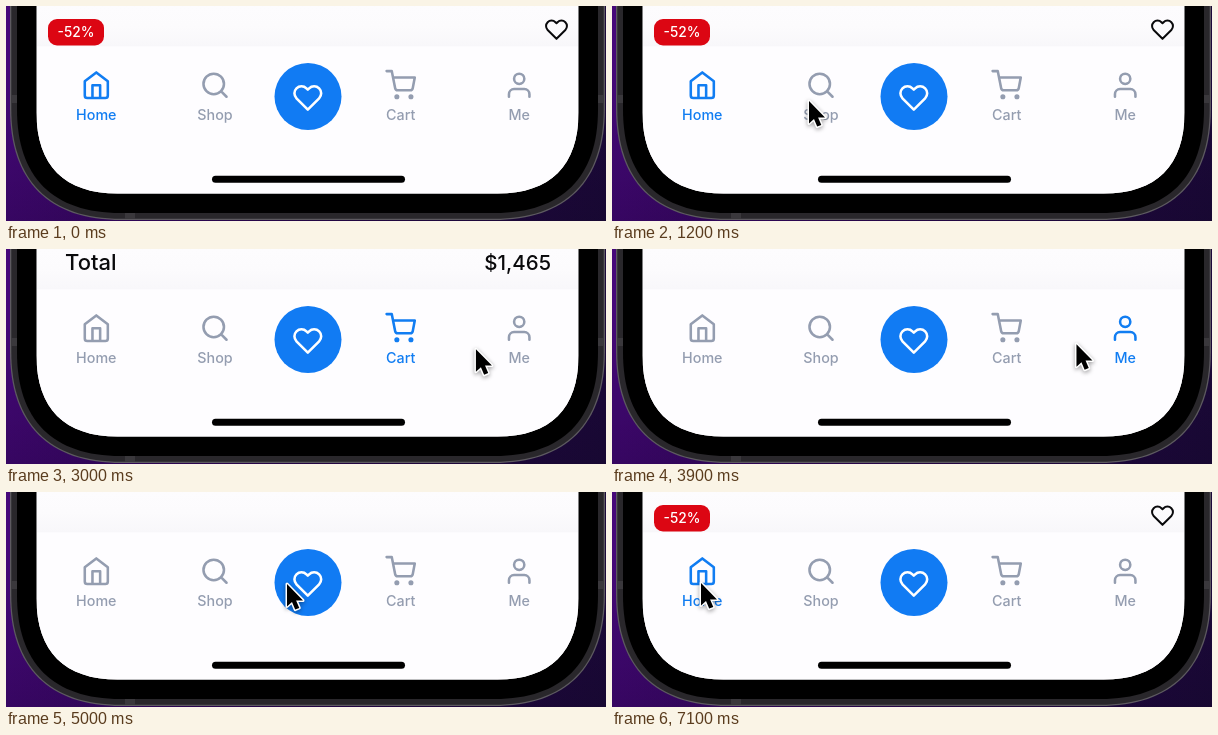
An HTML page with a canvas for the animation above (8000 ms loop, 600 px wide and 215 px high).

```html
<!DOCTYPE html>
<html lang="en">
<head>
<meta charset="utf-8">
<title>Tab bar</title>
<style>
  html, body { margin: 0; width: 100%; height: 100%; overflow: hidden; background: #2b0850; }
  canvas { display: block; width: 600px; height: 215px; }
</style>
</head>
<body>
<canvas id="stage"></canvas>
<script>
const W = 600, H = 215, LOOP = 8000, STEP = 100;
const BLUE = '#117df2', GREY = '#949db0', INK = '#0a0a0c';
const FONT = 'Inter, "Open Sans", sans-serif';

const canvas = document.getElementById('stage');
const ctx = canvas.getContext('2d');
const dpr = window.devicePixelRatio || 1;
canvas.width = W * dpr;
canvas.height = H * dpr;

const circle = (x, y, r) => `M${x - r} ${y}a${r} ${r} 0 1 0 ${2 * r} 0a${r} ${r} 0 1 0 ${-2 * r} 0`;
const HEART = new Path2D('M20.84 4.61a5.5 5.5 0 0 0-7.78 0L12 5.67l-1.06-1.06a5.5 5.5 0 0 0-7.78 7.78L12 21.23l8.84-8.84a5.5 5.5 0 0 0 0-7.78z');
const ARROW = new Path2D('M0 0V22.5L5 18L8.2 25.6L12.3 23.9L9.1 16.4H16Z');

const tabs = [
  { id: 'home', label: 'Home', x: 90.3, d: 'M3 9l9-7 9 7v11a2 2 0 0 1-2 2H5a2 2 0 0 1-2-2zM9 22V12h6v10' },
  { id: 'shop', label: 'Shop', x: 209, d: circle(11, 11, 8) + 'M21 21l-4.35-4.35' },
  { id: 'cart', label: 'Cart', x: 394.7, d: circle(9, 21, 1) + circle(20, 21, 1) + 'M1 1h4l2.68 13.39a2 2 0 0 0 2 1.61h9.72a2 2 0 0 0 2-1.61L23 6H6' },
  { id: 'me', label: 'Me', x: 513.2, d: 'M20 21v-2a4 4 0 0 0-4-4H8a4 4 0 0 0-4 4v2' + circle(12, 7, 4) }
].map(t => ({ ...t, path: new Path2D(t.d) }));

// [time, page opened]
const clicks = [
  [0, 'home'], [1400, 'shop'], [2300, 'saved'], [2800, 'cart'], [3600, 'me'],
  [4500, 'cart'], [5000, 'saved'], [5700, 'shop'], [6400, 'home']
];

// [time, x, y] of the pointer tip
const moves = [
  [100, 586, 190], [800, 86, 91], [900, 86, 91], [1200, 197, 95], [1400, 203, 93],
  [1800, 203, 93], [2200, 291, 94], [2300, 291, 94], [2600, 384, 98], [2800, 384, 98],
  [3100, 500, 101], [3200, 506, 98], [3700, 506, 98], [4200, 388, 90], [4500, 388, 90],
  [4800, 281, 92], [5100, 281, 92], [5500, 201, 92], [5700, 201, 92], [6100, 89, 91]
];

function pageAt(t) {
  return clicks.filter(c => c[0] <= t).pop()[1];
}

function pointerAt(t) {
  if (t < moves[0][0]) return null;
  const i = moves.findIndex(m => m[0] > t);
  if (i < 0) return moves[moves.length - 1].slice(1);
  const [t0, x0, y0] = moves[i - 1], [t1, x1, y1] = moves[i];
  const p = (t - t0) / (t1 - t0), e = p * p * (3 - 2 * p);
  return [x0 + (x1 - x0) * e, y0 + (y1 - y0) * e];
}

function gradient(x0, y0, x1, y1, ...colors) {
  const g = ctx.createLinearGradient(x0, y0, x1, y1);
  colors.forEach((c, i) => g.addColorStop(i / (colors.length - 1), c));
  return g;
}

function rect(x, y, w, h, fill, r = 0) {
  ctx.fillStyle = fill;
  ctx.beginPath();
  ctx.roundRect(x, y, w, h, r);
  ctx.fill();
}

function text(str, x, y, size, color, weight = 500, align = 'left') {
  ctx.font = `${weight} ${size}px ${FONT}`;
  ctx.textAlign = align;
  ctx.fillStyle = color;
  ctx.fillText(str, x, y);
}

function icon(path, cx, cy, scale, color) {
  ctx.save();
  ctx.translate(cx, cy);
  ctx.scale(scale, scale);
  ctx.translate(-12, -12);
  ctx.strokeStyle = color;
  ctx.lineWidth = 2;
  ctx.lineCap = ctx.lineJoin = 'round';
  ctx.stroke(path);
  ctx.restore();
}

// Lower half of the phone outline, inset by d
function phone(d) {
  const l = 4 + d, r = 599 - d, b = 214 - d, s = (97 - d) * 1.15, k = s * 0.346;
  const p = new Path2D();
  p.moveTo(l, -5);
  p.lineTo(l, b - s);
  p.bezierCurveTo(l, b - k, l + k, b, l + s, b);
  p.lineTo(r - s, b);
  p.bezierCurveTo(r - k, b, r, b - k, r, b - s);
  p.lineTo(r, -5);
  p.closePath();
  return p;
}

function fill(path, color) {
  ctx.fillStyle = color;
  ctx.fill(path);
}

const pages = {
  home() {
    rect(42, 13, 56, 26.5, '#dc0613', 9);
    text('-52%', 70, 31.2, 13.8, '#fff', 500, 'center');
    icon(HEART, 550.5, 23.6, 1, INK);
  },
  shop() {
    rect(59, 0, 358, 40.5, '#eeedef');
    text('0 item', 81, 7.5, 17, '#9a9ba9', 400);
    rect(459.5, -8, 45, 16, gradient(459, 0, 505, 8, '#b9babd', '#d2d2d5', '#bdbdc0'), 2);
  },
  cart() {
    text('Total', 59, 21.3, 22, INK);
    text('$1,465', 545, 21.3, 20.5, INK, 500, 'right');
  },
  saved() {},
  me() {}
};

function drawPhone() {
  rect(0, 0, W, H, gradient(0, 0, W, 0, '#46087a', '#2c0752', '#1c0a3a'));
  rect(0, 0, W, H, gradient(0, 60, 0, H, 'rgba(10,0,25,0)', 'rgba(10,0,25,.25)'));
  fill(phone(0), '#5d5a60');
  fill(phone(1.3), '#29272b');
  const band = '#3a383c';
  rect(5, 89, 6, 8, band);
  rect(592, 89, 6, 8, band);
  rect(119, 207, 10, 6, band);
  fill(phone(7), '#000');
}

function drawBar(page) {
  rect(31, 40.5, 541, 148, '#fefdff');
  for (const t of tabs) {
    const color = t.id === page ? BLUE : GREY;
    icon(t.path, t.x, 79.2, 1.28, color);
    text(t.label, t.x, 113.5, 14.3, color, 500, 'center');
  }
  rect(268.5, 57, 67, 67, '#117bf3', 33.5);
  icon(HEART, 301.8, 91.8, 1.28, '#fff');
  rect(206, 169.7, 193, 7, '#000', 3.5);
}

function drawPointer([x, y]) {
  ctx.save();
  ctx.translate(x, y);
  ctx.lineJoin = 'round';
  ctx.lineWidth = 3;
  ctx.strokeStyle = '#fff';
  ctx.shadowColor = 'rgba(0,0,0,.4)';
  ctx.shadowBlur = 4 * dpr;
  ctx.shadowOffsetY = 1.5 * dpr;
  ctx.stroke(ARROW);
  ctx.shadowColor = 'transparent';
  fill(ARROW, '#000');
  ctx.restore();
}

function draw(t) {
  const page = pageAt(t), pointer = pointerAt(t);
  ctx.setTransform(dpr, 0, 0, dpr, 0, 0);
  drawPhone();
  ctx.save();
  const screen = phone(26.5);
  fill(screen, '#fefdff');
  ctx.clip(screen);
  rect(31, 0, 541, 40.5, gradient(0, 0, 0, 40.5, '#fdfcfe', '#fcfbfd', '#f8f7fa'));
  pages[page]();
  drawBar(page);
  ctx.restore();
  if (pointer) drawPointer(pointer);
}

function tick() {
  const t = performance.now() % LOOP;
  draw(Math.floor(t / STEP) * STEP);
  requestAnimationFrame(tick);
}
tick();
</script>
</body>
</html>
```
